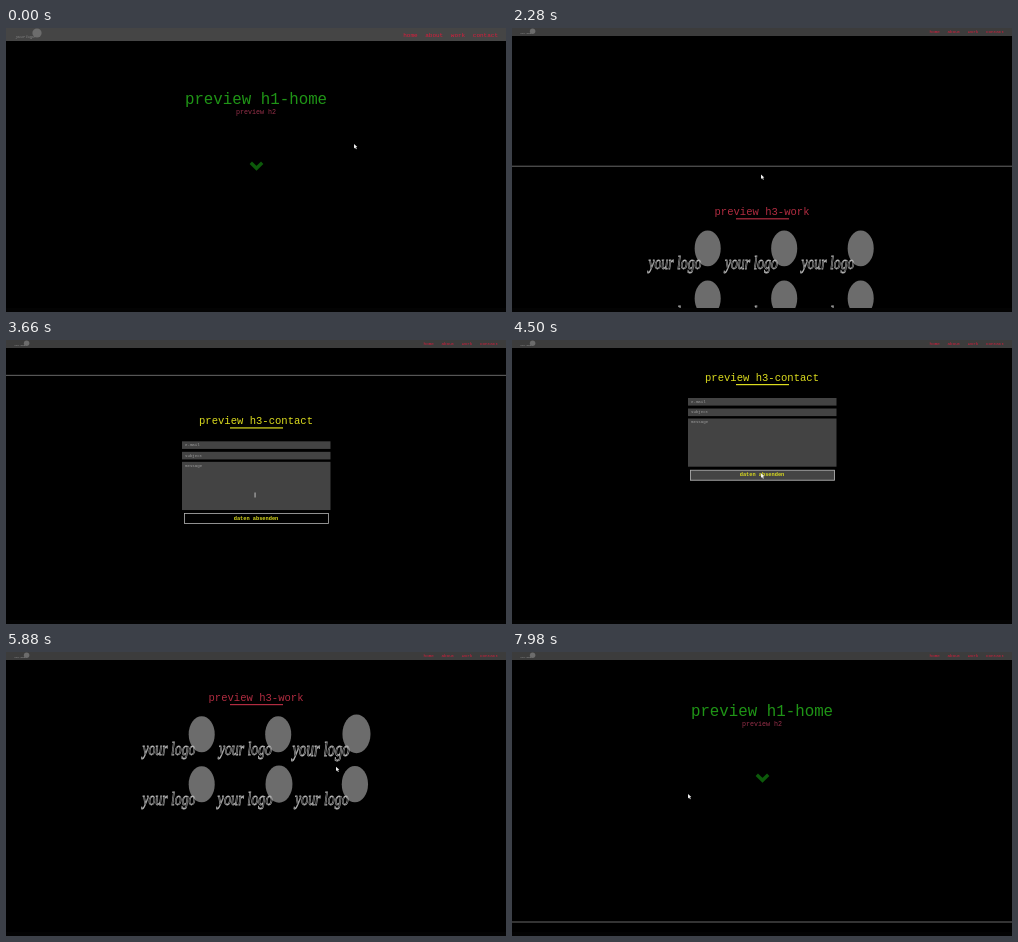
Recreate the animation shown at these times as an HTML page with a canvas. Size 500 px wide and 284 px high, loop 8000 ms.

```html
<!DOCTYPE html>
<html lang="en">
<head>
<meta charset="utf-8">
<title>Page preview</title>
<style>
html, body { margin: 0; width: 100%; height: 100%; overflow: hidden; background: #000; }
canvas { display: block; }
</style>
</head>
<body>
<canvas id="stage" width="500" height="284"></canvas>
<script>
const ctx = document.getElementById('stage').getContext('2d');
const LOOP = 8000, FADE = 300;
const ABOUT = 282, WORK = 567, CONTACT = 851;
const MONO = '"Liberation Mono", monospace';
const RED = '#b02c40', YELLOW = '#dcdc1e', CYAN = '#18bcd4', GREEN = '#1f9416', LEAF = '#35a82a';

// [time, value, ...]
const scrollKeys = [
  [0, 0], [600, 0], [1440, 248], [3000, 591], [3660, 815.5], [4050, 859], [4960, 859],
  [5160, 797.5], [5570, 567], [6370, 567], [6810, 448], [7980, 12]
];
const mouseKeys = [
  [0, 348, 116], [600, 250, 144], [1440, 249, 146], [3000, 249, 147], [3660, 249, 155],
  [4050, 249, 134], [5160, 249, 133], [5560, 249, 133], [5780, 330, 95], [6000, 330, 150],
  [6160, 262, 172], [6360, 186, 172], [6450, 176, 142]
];

// Monotone cubic interpolation
function track(keys, t, c = 1) {
  const last = keys.length - 1;
  if (t <= keys[0][0]) return keys[0][c];
  if (t >= keys[last][0]) return keys[last][c];
  const i = keys.findIndex(k => k[0] > t) - 1;
  const slope = j => j < 0 || j >= last ? 0
    : (keys[j + 1][c] - keys[j][c]) / (keys[j + 1][0] - keys[j][0]);
  const tangent = j => {
    const a = slope(j - 1), b = slope(j);
    return a * b > 0 ? 2 * a * b / (a + b) : j === last ? a : 0;
  };
  const h = keys[i + 1][0] - keys[i][0], u = (t - keys[i][0]) / h, v = 1 - u;
  return v * v * (1 + 2 * u) * keys[i][c] + u * u * (3 - 2 * u) * keys[i + 1][c]
    + h * u * v * (v * tangent(i) - u * tangent(i + 1));
}

const scrollAt = t => track(scrollKeys, t);
const mouseAt = t => ({ x: track(mouseKeys, t, 1), y: track(mouseKeys, t, 2) });

function over(t, x, y, w, h) {
  const m = mouseAt(t), py = m.y + scrollAt(t);
  return m.x >= x && m.x <= x + w && py >= y && py <= y + h;
}

// Share of the last FADE ms during which a condition held: a CSS-like transition
function eased(t, test) {
  let n = 0;
  for (let k = 0; k < 15; k++) n += test(Math.max(0, t - k * FADE / 15)) ? 1 : 0;
  return n / 15;
}

function text(str, x, y, size, color, align = 'center', weight = '') {
  ctx.font = `${weight} ${size}px ${MONO}`;
  ctx.textAlign = align;
  ctx.textBaseline = 'alphabetic';
  ctx.fillStyle = color;
  ctx.fillText(str, x, y + size * 0.27);
}

function rect(x, y, w, h, color) {
  ctx.fillStyle = color;
  ctx.fillRect(x, y, w, h);
}

// Placeholder logo; (x, y) is the middle of its disc
function logo(x, y, sx, sy, ink = '#b4b4b4') {
  ctx.save();
  ctx.translate(x, y);
  ctx.scale(sx, sy);
  ctx.fillStyle = '#6c6c6c';
  ctx.beginPath();
  ctx.arc(0, 0, 10.5, 0, 7);
  ctx.fill();
  ctx.font = 'italic 11.1px "Liberation Serif", serif';
  ctx.textAlign = 'right';
  ctx.strokeStyle = ink;
  ctx.lineWidth = 0.45;
  ctx.strokeText('your logo', -5, 12);
  ctx.restore();
}

function section(top, title, color) {
  rect(0, top - 0.5, 500, 1, '#686868');
  text(title, 250, top + 46, 10.55, color);
  rect(224, top + 52, 53, 1.2, color);
}

function home() {
  text('preview h1-home', 250, 72, 15.8, GREEN);
  text('preview h2', 250, 84, 6.7, '#98304a');
  ctx.strokeStyle = '#0c5a0a';
  ctx.lineWidth = 3.4;
  ctx.beginPath();
  ctx.moveTo(244.8, 134.8);
  ctx.lineTo(250.5, 140.3);
  ctx.lineTo(256.2, 134.8);
  ctx.stroke();
}

function about() {
  section(ABOUT, 'preview h3-about', CYAN);
  logo(269, ABOUT + 73, 1, 1);
  text('preview h4', 250, ABOUT + 98.5, 5.25, LEAF);
  text('preview paragraph: lorem ipsum dolor sit amet, consetetur sadipscing elitr, sed diam nonumy eirmod tempor invidunt ut labore et dolore magna aliquyam erat,',
    250, ABOUT + 111, 4.21, LEAF);
  text('sed diam voluptua. at vero eos et accusam et justo duo dolores et ea rebum. stet clita kasd gubergren, no sea takimata sanctus est lorem ipsum dolor sit amet.',
    250, ABOUT + 115.5, 4.21, LEAF);
}

function work(t) {
  section(WORK, 'preview h3-work', RED);
  for (let i = 0; i < 6; i++) {
    const x = 137 + i % 3 * 76.5, y = WORK + 64.2 + (i > 2 ? 50 : 0);
    const zoom = 1 + 0.13 * eased(t, q => over(q, x, y, 72, 45));
    ctx.save();
    ctx.translate(x + 36, y + 22);
    ctx.scale(zoom, zoom);
    logo(22.7, -4, 1.24, 1.71);
    ctx.restore();
  }
}

const fields = [['e-mail', 66, 7.6], ['subject', 76.5, 7.6], ['message', 86.5, 48.2]];

function contact(t) {
  section(CONTACT, 'preview h3-contact', YELLOW);
  for (const [label, dy, h] of fields) {
    rect(176, CONTACT + dy, 148.5, h, '#434343');
    text(label, 179, CONTACT + dy + 3.6, 4.1, '#a0a0a0', 'left');
  }
  const y = CONTACT + 138;
  const glow = eased(t, q => over(q, 178, y, 145, 11));
  if (glow) rect(178, y, 145, 10.5, `rgba(68,68,68,${glow})`);
  ctx.strokeStyle = '#b4b4b4';
  ctx.lineWidth = 0.8;
  ctx.strokeRect(178.5, y + 0.2, 144, 10);
  text('daten absenden', 250, y + 5, 5.3, YELLOW, 'center', 'bold');
}

function header(t) {
  const small = eased(t, q => scrollAt(q) > 2);
  const mix = (a, b) => a + (b - a) * small;
  const shade = Math.round(mix(69, 60));
  rect(0, 0, 500, mix(13, 8), `rgb(${shade},${shade},${shade})`);
  const k = mix(0.44, 0.26);
  logo(mix(31, 20.6), mix(5, 3.2), k, k, '#7c7c7c');
  const size = mix(6, 4.3);
  let right = 492;
  for (const item of ['contact', 'work', 'about', 'home']) {
    text(item, right, mix(7, 4), size, '#dc1c3c', 'right');
    right -= item.length * size * 0.6 + 7.6;
  }
}

function pointer(t) {
  const { x, y } = mouseAt(t);
  if (fields.some(([, dy, h]) => over(t, 176, CONTACT + dy, 148, h))) {
    rect(x - 0.4, y - 2.5, 0.9, 5, '#ccc');
    return;
  }
  ctx.fillStyle = '#f0f0f0';
  ctx.beginPath();
  for (const [dx, dy] of [[0, 0], [0, 4.4], [1.1, 3.6], [2, 5.3], [2.8, 4.9], [2, 3.2], [3.3, 3]])
    ctx.lineTo(x + dx, y + dy);
  ctx.fill();
}

function draw(now) {
  const t = now % LOOP;
  rect(0, 0, 500, 284, '#000');
  ctx.save();
  ctx.translate(0, -scrollAt(t));
  home();
  about();
  work(t);
  contact(t);
  ctx.restore();
  rect(0, 280, 500, 4, '#030303');
  header(t);
  pointer(t);
}

const start = performance.now();
function tick() {
  draw(performance.now() - start);
  requestAnimationFrame(tick);
}
tick();
</script>
</body>
</html>
```
